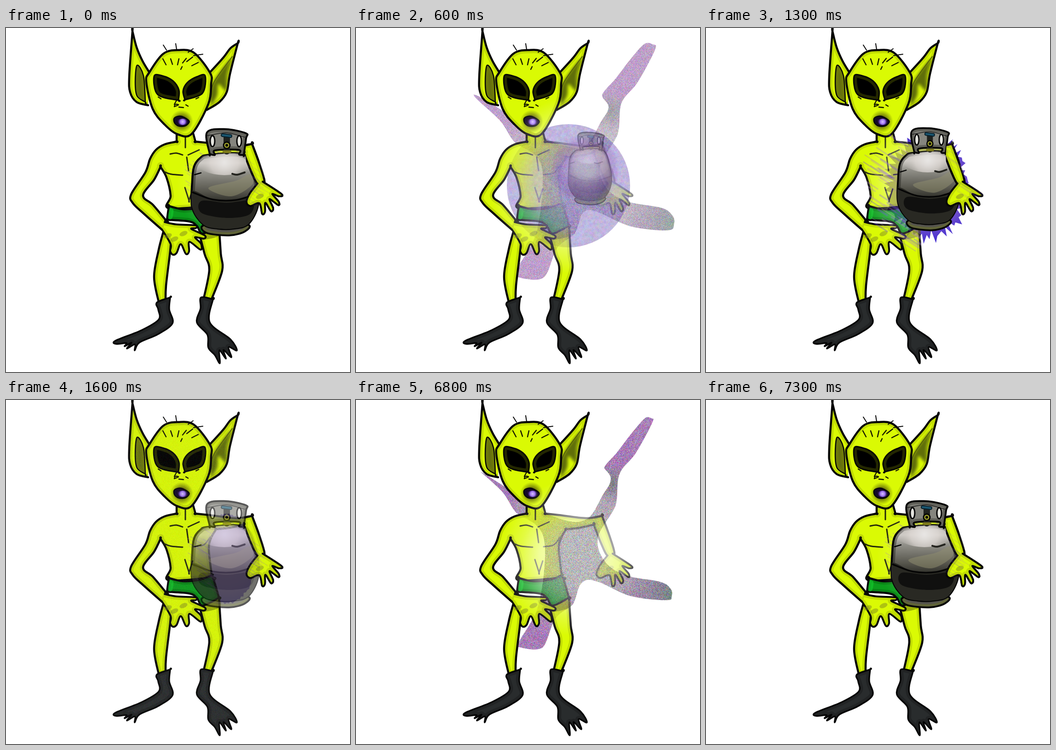
Write an HTML page with a canvas that moves like this. It is 748x748 px and loops after 8000 ms.

```html
<!DOCTYPE html>
<html lang="en">
<head>
<meta charset="utf-8">
<title>Alien and gas bottle</title>
<style>
html, body { margin: 0; width: 100%; height: 100%; overflow: hidden; background: #fff; }
canvas { display: block; width: 100vw; height: 100vh; object-fit: contain; }
</style>
</head>
<body>
<canvas id="stage" width="748" height="748"></canvas>
<script>
const SIZE = 748, LOOP = 8000, STEP = 100, TAU = Math.PI * 2;
const SKIN = '#dafa04', INK = '#050505';
const layer = () => Object.assign(document.createElement('canvas'), { width: SIZE, height: SIZE }).getContext('2d');
const stage = document.getElementById('stage').getContext('2d');
const body = layer(), masked = layer(), fx = layer(), tankLayer = layer();

function random(seed) {
  return () => (seed = (seed * 1664525 + 1013904223) >>> 0) / 4294967296;
}

// Smooth curve through points; "!" marks a sharp corner.
function curve(text, closed) {
  const p = text.trim().split(/\s+/).flatMap(s => {
    const point = s.replace('!', '').split(',').map(Number);
    return s.endsWith('!') ? [point, point] : [point];
  });
  const n = p.length, path = new Path2D();
  const at = i => closed ? p[(i + n) % n] : p[Math.max(0, Math.min(n - 1, i))];
  path.moveTo(...p[0]);
  for (let i = 0; i < (closed ? n : n - 1); i++) {
    const [a, b, c, d] = [at(i - 1), at(i), at(i + 1), at(i + 2)];
    path.bezierCurveTo(b[0] + (c[0] - a[0]) / 6, b[1] + (c[1] - a[1]) / 6,
      c[0] - (d[0] - b[0]) / 6, c[1] - (d[1] - b[1]) / 6, c[0], c[1]);
  }
  if (closed) path.closePath();
  return path;
}

function oval(x, y, rx, ry, turn = 0) {
  const path = new Path2D();
  path.ellipse(x, y, rx, ry, turn, 0, TAU);
  return path;
}

function fill(g, path, color) {
  g.fillStyle = color;
  g.fill(path);
}

function ink(g, path, width = 4.5, color = INK) {
  g.lineWidth = width;
  g.lineCap = g.lineJoin = 'round';
  g.strokeStyle = color;
  g.stroke(path);
}

function shape(g, path, color, width = 4.5, shade = 'rgba(125,140,0,.28)') {
  fill(g, path, color);
  g.save();
  g.clip(path);
  ink(g, path, 14, shade);
  g.restore();
  ink(g, path, width);
}

// Colours are spaced evenly from the centre outwards.
function radial(g, x, y, r, ...colors) {
  const gradient = g.createRadialGradient(x, y, 0, x, y, r);
  colors.forEach((color, i) => gradient.addColorStop(i / (colors.length - 1), color));
  return gradient;
}

function noiseTile() {
  const c = document.createElement('canvas');
  c.width = c.height = 256;
  const g = c.getContext('2d'), image = g.createImageData(256, 256), rnd = random(7);
  for (let i = 0; i < image.data.length; i++) image.data[i] = i % 4 === 3 ? 255 : rnd() * 256;
  g.putImageData(image, 0, 0);
  return c;
}
const tile = noiseTile();

function addNoise(g, alpha, scale = 1, shift = 0) {
  g.save();
  g.globalCompositeOperation = 'source-atop';
  g.globalAlpha = alpha;
  g.scale(scale, scale);
  g.translate(-shift % 256, -(shift * 3) % 256);
  g.fillStyle = g.createPattern(tile, 'repeat');
  g.fillRect(0, 0, SIZE + 256, SIZE + 256);
  g.restore();
}

function drawLegs(g) {
  shape(g, curve('343,440 332,482 322,541 332,596! 347,595! 348,560 357,485 360,445'), SKIN);
  shape(g, curve('420,446 432,492 442,526 429,592! 446,592! 470,528 467,490 463,428'), SKIN);
  fill(g, curve('424,447 463,436 463,452 428,460', true), 'rgba(95,100,10,.5)');
  const sock = '#292c2d', shade = 'rgba(0,0,0,.2)';
  shape(g, curve(`328,597 357,586! 355,612 362,642 330,666 290,684 280,701 280,688 263,697 273,684
    258,692 262,685 240,687 238,680 295,657 332,634 331,612`, true), sock, 3.5, shade);
  shape(g, curve(`424,586 450,590! 443,640 488,677 502,701 484,694 490,716 473,700 478,719 464,701
    465,729 454,711 440,695 438,667 415,640 423,610`, true), sock, 3.5, shade);
}

function drawTorso(g) {
  shape(g, curve(`371,229 371,247! 345,253 326,265 313,285 303,314 272,362 276,381 300,404 343,442!
    350,421! 320,385 298,364 322,330 336,302! 349,325 358,365 354,392 448,386! 441,325 446,300 457,281!
    485,278 517,271! 533,312 547,339 562,335 552,298 535,252! 500,257 440,250 412,247! 407,229`), SKIN);
  ['357,274 370,272 384,276', '396,276 420,265', '393,281 397,310', '390,237 390,260',
    '345,313 360,318 384,320', '408,319 430,315 445,297', '389,347 398,375! 406,350'
  ].forEach(s => ink(g, curve(s), 3, '#22260a'));
  shape(g, curve(`354,387! 384,394 420,391 448,381! 453,395 463,430! 428,447
    416,432 400,421 350,417!`, true), '#0c9d1c', 4.5, 'rgba(0,60,0,.25)');
  fill(g, curve('356,393 364,396 361,414 353,413', true), 'rgba(20,205,45,.6)');
}

function drawHands(g) {
  shape(g, curve(`345,422 370,427 412,429 413,435 403,437 432,451 430,458 411,455 424,469 423,482
    399,465 398,486 391,491 380,470 371,489 363,493 357,485 358,470 341,441`), SKIN, 4);
  shape(g, curve(`558,334 599,361 594,366 579,361 593,378 592,385 573,372 581,392 576,398 564,380
    563,400 557,404 551,381 531,387 523,378 530,360 547,338`), SKIN, 4);
  [[352, 452], [366, 459], [386, 447], [552, 366]].forEach(([x, y]) =>
    fill(g, oval(x, y, 9, 5, -.4), 'rgba(130,140,30,.5)'));
}

function drawHead(g) {
  shape(g, curve('312,97 297,72 284,42 275,7! 268,105 270,140 284,161 309,168'), SKIN);
  shape(g, curve('285,81 281,118 285,148 303,161! 299,104', true), '#66700f', 2.5);
  shape(g, curve('442,98 472,65 488,44 504,33! 487,100 480,139 464,161 437,178'), SKIN);
  g.save();
  g.filter = 'blur(3px)';
  fill(g, curve('489,66 449,122 445,166 459,147 462,122 478,135 481,100', true), 'rgba(65,75,12,.8)');
  g.restore();
  ink(g, curve('492,62 452,118 446,150'), 2, '#555f0b');
  shape(g, curve(`312,96 342,56 375,48 409,54 444,98 446,122 440,165 404,230 373,231 345,210
    319,176 305,117`, true), SKIN);
  ['349,48 342,37', '371,47 369,34', '396,53 407,45', '408,60 428,57']
    .forEach(s => ink(g, curve(s), 2));
  ['341,67 348,80', '358,67 362,79', '376,67 373,80', '392,66 384,76', '406,63 393,73', '383,84 380,90', '418,75 404,82',
    '331,150 337,154', '413,154 419,151', '371,157 366,166', '366,171 368,166 375,167 366,171',
    '376,172 386,173', '391,167 396,170'
  ].forEach(s => ink(g, curve(s), 2.4, '#161800'));
  shape(g, curve('322,105 340,104 363,115 376,135 375,157! 330,145', true), '#000', 3);
  shape(g, curve('433,104 415,106 394,119 385,137 389,156! 427,142', true), '#000', 3);
  fill(g, oval(382, 203, 25, 25), radial(g, 382, 203, 25, '#555', 'rgba(80,80,10,.7)', 'rgba(90,100,0,0)'));
  shape(g, curve('365,202 368,194 382,192 398,202 393,211 382,214 371,211', true), '#1c0b38', 2.5, 'rgba(0,0,0,.3)');
  fill(g, oval(384, 204, 11, 7), radial(g, 384, 204, 11, '#d9c5ff', '#9b70f0', 'rgba(60,20,130,0)'));
}

const tankBody = curve(`442,276 422,283 409,301 405,332 405,390 429,427 460,436 495,436 527,426 548,385
  545,332 520,277`, true);

function drawTank(g) {
  shape(g, curve('433,428 435,445 485,451 520,442 523,427', true), '#55544d', 4);
  const metal = g.createLinearGradient(0, 273, 0, 375);
  ['#b8b6b2', '#d2cfca', '#92918a', '#74736b', '#57564d', '#34342e']
    .forEach((color, i) => metal.addColorStop(i / 5, color));
  shape(g, tankBody, metal, 4.5, 'rgba(20,20,15,.4)');
  g.save();
  g.clip(tankBody);
  fill(g, oval(475, 292, 60, 28), radial(g, 475, 292, 60, '#e8e6e4', 'rgba(222,216,212,.7)', 'rgba(180,175,170,0)'));
  fill(g, curve('440,348 500,332 530,318 536,340 490,366', true), 'rgba(145,143,112,.5)');
  fill(g, curve('400,357 450,373 500,374 550,360! 550,445! 400,445!', true), '#292923');
  fill(g, curve('425,376 480,380 535,376 530,405 480,413 425,402', true), 'rgba(8,8,8,.75)');
  ink(g, curve('405,357 450,373 500,374 546,360'), 3.5);
  g.restore();
  ink(g, curve('492,317 503,319 519,314'), 4, '#24241f');
  ink(g, curve('410,319 424,315'), 2.5);
  shape(g, curve(`437,227 478,220 522,229 522,240 517,276! 507,275 506,265 455,266 454,276
    443,274!`, true), '#85857e', 4, 'rgba(30,30,25,.35)');
  ink(g, curve('438,234 480,228 521,238'), 2, '#2a2a28');
  [449, 507].forEach(x => {
    fill(g, oval(x, 246, 5, 12), '#e5e5df');
    ink(g, oval(x, 246, 5, 12), 3);
  });
  ink(g, curve('480,238 480,268'), 14, '#20221f');
  const handle = curve('471,233 488,235');
  ink(g, handle, 8, '#08202c');
  ink(g, handle, 4, '#1b5872');
  ink(g, curve('474,269 487,269'), 6, '#7d7a1a');
  shape(g, oval(480, 255, 7, 7), '#b0ad3c', 3);
  fill(g, oval(480, 255, 3, 3), INK);
}

const splat = curve(`256,152 267,145 340,190 380,220 450,252 498,252 530,202 546,172 532,145 562,108
  595,65 625,32 645,32 654,46 615,120 580,165 572,232 534,300 548,347 590,374 665,388 690,405 695,425 680,443
  595,434 524,403 496,404 478,449 440,480 410,545 352,545 346,525 390,440 400,300 342,250 312,205`, true);

function drawSplat(erode, shift) {
  fx.clearRect(0, 0, SIZE, SIZE);
  fill(fx, splat, radial(fx, 490, 325, 270, '#d6d2da', '#d2ced8', '#b48fc4', '#a83fd0', '#a848cc'));
  fx.globalCompositeOperation = 'source-atop';
  fill(fx, oval(690, 425, 110, 110), radial(fx, 690, 425, 110, '#2e6650', 'rgba(90,70,110,0)'));
  fill(fx, oval(555, 180, 42, 42), radial(fx, 555, 180, 42, 'rgba(35,60,45,.75)', 'rgba(50,50,70,0)'));
  addNoise(fx, .5, 1, shift);
  if (erode > 0) {
    fx.globalCompositeOperation = 'destination-out';
    ink(fx, splat, erode * 2);
  }
  fx.globalCompositeOperation = 'source-over';
}

function drawOrb(shift) {
  fx.clearRect(0, 0, SIZE, SIZE);
  fill(fx, oval(462, 343, 134, 134), '#4315e6');
  addNoise(fx, .36, 4, shift);
  addNoise(fx, .25, 1, shift);
}

function drawFringe(amount) {
  const rnd = random(31), count = 96;
  fx.clearRect(0, 0, SIZE, SIZE);
  fx.fillStyle = radial(fx, 480, 345, 130, '#9b70cc', '#8660cc', '#3a28d0');
  fx.beginPath();
  for (let i = 0; i < count; i++) {
    const a = i / count * TAU, jag = ((i % 2 ? 5 : -8) + (rnd() - .5) * 20) * amount;
    fx.lineTo(480 + Math.cos(a) * (58 + 30 * amount + jag), 345 + Math.sin(a) * (94 + 16 * amount + jag));
  }
  fx.fill();
}

// Slanted violet wisps painted over the skin.
function tintBody(amount) {
  const rnd = random(12), colors = ['#7948d8', '#a070b8', '#5b35dc', '#b58a88'];
  masked.save();
  masked.globalCompositeOperation = 'source-atop';
  masked.globalAlpha = .34;
  for (let i = 0; i < 150; i++) {
    const a = rnd() * TAU, r = (60 + 68 * amount) * Math.sqrt(.3 + .7 * rnd());
    const x = 478 + Math.cos(a) * r, y = 345 + Math.sin(a) * r * 1.1, len = 7 + rnd() * 15;
    ink(masked, new Path2D(`M${x - len} ${y - len * .65}L${x + len} ${y + len * .65}`), 1 + rnd() * 4 * amount, colors[i % 4]);
  }
  masked.restore();
}

const BARE = { splat: 0, erode: 8, orb: 0, fringe: 0, tank: 0, scale: 1, glow: 0, fade: 0, grain: 0 };
const HOLDING = { ...BARE, fringe: .25, tank: 1, fade: .3 };
const BURST = { ...BARE, splat: 1, erode: 0, scale: .6, fade: 1 };
const ORB = { ...BARE, orb: 1, tank: 1, scale: .7, glow: 1, fade: .97 };
const WISPS = { ...HOLDING, fringe: 1, scale: .92, fade: .6 };
const GRAINY = { ...BARE, grain: 1 };
const FADED = { ...BURST, splat: .82, erode: 8, fade: .8 };
const KEYS = [[0, HOLDING], [400, BURST], [900, ORB], [1300, WISPS], [1500, HOLDING], [1800, GRAINY],
  [6799, GRAINY], [6800, FADED], [7000, ORB], [7200, WISPS], [7300, HOLDING], [LOOP, HOLDING]];

function stateAt(time) {
  const i = KEYS.findIndex(key => key[0] > time), [start, from] = KEYS[i - 1], [end, to] = KEYS[i];
  const f = (time - start) / (end - start);
  return Object.fromEntries(Object.keys(BARE).map(name => [name, from[name] + (to[name] - from[name]) * f]));
}

function paint(source, alpha = 1) {
  stage.globalAlpha = alpha;
  stage.drawImage(source.canvas, 0, 0);
  stage.globalAlpha = 1;
}

function drawMaskedBody({ fringe, fade, grain }) {
  masked.clearRect(0, 0, SIZE, SIZE);
  masked.drawImage(body.canvas, 0, 0);
  if (fringe > 0) tintBody(fringe);
  if (fade > 0) {
    const holes = [1, .95, .75, .3, 0].map(a => `rgba(0,0,0,${a * fade})`);
    masked.globalCompositeOperation = 'destination-out';
    masked.fillStyle = radial(masked, 485, 342, 80 + 115 * fade, ...holes);
    masked.fillRect(0, 0, SIZE, SIZE);
    masked.globalCompositeOperation = 'source-over';
  }
  if (grain > 0) addNoise(masked, .19 * grain);
}

function drawTankLayer(scale) {
  const shrink = (1 - scale) / .3;
  tankLayer.clearRect(0, 0, SIZE, SIZE);
  tankLayer.save();
  tankLayer.translate(476 + 27 * shrink, 336 - 25 * shrink);
  tankLayer.scale(scale, scale + .04 * Math.min(1, shrink * 4));
  tankLayer.translate(-476, -336);
  drawTank(tankLayer);
  tankLayer.restore();
}

function drawGlow(alpha) {
  stage.globalAlpha = alpha;
  fill(stage, oval(498, 306, 76, 76), radial(stage, 498, 306, 76,
    '#ebe7ff', '#e5dcfa', 'rgba(190,155,225,.95)', 'rgba(140,85,190,.75)', 'rgba(95,45,170,0)'));
  stage.globalAlpha = 1;
}

const forearm = curve('523,251! 545,251! 562,325 606,360 590,392 558,410 518,388 526,355 540,338 523,300', true);

function render(step) {
  const s = stateAt(step * STEP), shift = step * 37;
  stage.fillStyle = '#fff';
  stage.fillRect(0, 0, SIZE, SIZE);
  if (s.splat > 0) { drawSplat(s.erode, shift); paint(fx, s.splat); }
  if (s.orb > 0) { drawOrb(shift); paint(fx, s.orb); }
  if (s.fringe > 0) { drawFringe(s.fringe); paint(fx, Math.min(1, s.fringe * 4)); }
  drawMaskedBody(s);
  paint(masked);
  if (s.tank > 0) { drawTankLayer(s.scale); paint(tankLayer, s.tank); }
  if (s.glow > 0) drawGlow(s.glow);
  if (s.fringe > 0) {
    stage.save();
    stage.clip(forearm);
    paint(body, s.tank * (1 - s.glow));
    paint(masked, .5);
    stage.restore();
  }
}

[drawLegs, drawTorso, drawHands, drawHead].forEach(draw => draw(body));

let shown = -1;
function tick() {
  const step = Math.floor(performance.now() % LOOP / STEP);
  if (step !== shown) render(shown = step);
  requestAnimationFrame(tick);
}
tick();
</script>
</body>
</html>
```
